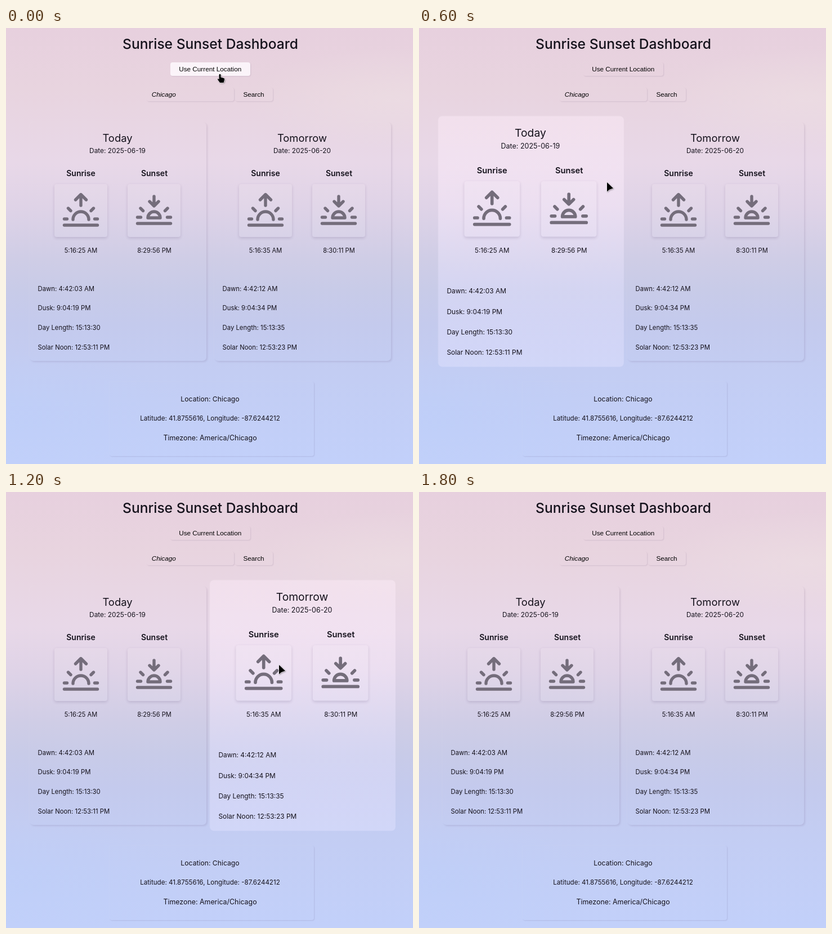
Recreate the animation shown at these times as an HTML page. Size 723 px wide and 774 px high, loop 1.85 s.

```html
<!DOCTYPE html>
<html lang="en">
<head>
<meta charset="utf-8">
<title>Sunrise Sunset Dashboard</title>
<style>
html, body { margin: 0; width: 100%; height: 100%; overflow: hidden; }
#stage {
  position: relative; width: 723px; height: 774px; overflow: hidden;
  background:
    radial-gradient(ellipse 260px 90px at 690px 125px, rgba(238,224,228,.55), transparent),
    radial-gradient(ellipse 330px 120px at 0 690px, rgba(186,207,251,.4), transparent),
    linear-gradient(#e7d0de, #e8d4df 14%, #e8d8e8 31%, #dfd3e7 41%, #cfcde6 53%,
      #c8cbe8 60%, #c4caed 68%, #c3cdf3 79%, #c2d0fa);
}
#stage div { position: absolute; box-sizing: border-box; }
svg { position: absolute; left: 0; top: 0; overflow: visible; }
text { font-family: Poppins, Inter, sans-serif; fill: #15121c; }
text.ui { font-family: Arial, "Liberation Sans", sans-serif; fill: #000; }
.raised { border-radius: 4px; box-shadow: 1px 1px 2px rgba(70,50,90,.13), -1px -1px 2px rgba(255,255,255,.07); }
.card { top: 167px; width: 313.5px; height: 424px; border-radius: 7px; }
.glow {
  inset: 0; border-radius: 7px;
  background: linear-gradient(rgba(255,238,250,.42), rgba(255,240,255,.4) 35%, rgba(228,226,255,.42) 70%, rgba(226,226,255,.46));
}
.tile {
  top: 110px; width: 94px; height: 94px; border-radius: 4px;
  background: rgba(255,255,255,.06); box-shadow: 0 2px 5px rgba(60,40,90,.16);
}
.tile path { fill: none; stroke: #746d7b; stroke-width: 5.4; stroke-linecap: round; stroke-linejoin: round; }
#cursor { filter: drop-shadow(1px 1px 1px rgba(0,0,0,.35)); }
#arrow, #hand { stroke: #fff; stroke-width: 1; paint-order: stroke; }
#beam { fill: none; stroke: #444; stroke-width: 1.2; }
</style>
</head>
<body>
<div id="stage"></div>
<script>
const LOOP = 1850, STEP = 50, FADE = 150;
const find = id => document.getElementById(id);

const text = (x, y, size, str, extra = '') =>
  `<text x="${x}" y="${y}" font-size="${size}" ${extra}>${str}</text>`;
const mid = (x, y, size, str, extra = '') => text(x, y, size, str, 'text-anchor="middle" ' + extra);
const svg = (w, h, body) => `<svg width="${w}" height="${h}">${body}</svg>`;
const box = (x, y, w, h, id = '') =>
  `<div class="raised" id="${id}" style="left:${x}px;top:${y}px;width:${w}px;height:${h}px"></div>`;

const RISE = 'M0 38V19M-9.5 28L0 18.5L9.5 28M-22.5 43l4.5 4.5M22.5 43l-4.5 4.5' +
  'M-14 63A14 14 0 0 1 14 63M-29.5 62h5M29.5 62h-5M-29.5 73h59';
const SET = 'M0 22V38M-8 31L0 39L8 31M-24 43l4.5 4.5M24 43l-4.5 4.5' +
  'M-11 60A11 11 0 0 1 11 60ZM-29.5 59h6M29.5 59h-6M-29.5 70h59';

const tile = (x, d) =>
  `<div class="tile" style="left:${x}px">${svg(94, 94, `<path transform="translate(47)" d="${d}"/>`)}</div>`;

function card(id, x, title, date, rise, set, rows) {
  return `<div class="raised card" id="${id}" style="left:${x}px"><div class="glow"></div>` +
    tile(44, RISE) + tile(174, SET) +
    svg(313, 424,
      mid(156, 34.8, 18.4, title) +
      mid(156, 54.7, 11.9, 'Date: ' + date) +
      mid(91, 96.4, 14, 'Sunrise', 'font-weight="600"') +
      mid(221.5, 96.4, 14, 'Sunset', 'font-weight="600"') +
      mid(91, 231.5, 11.1, rise) + mid(221.5, 231.5, 11.1, set) +
      rows.map((r, i) => text(14.5, 299.8 + 34.6 * i, 11.35, r)).join('')) + '</div>';
}

find('stage').innerHTML =
  box(292, 61, 142, 23.5, 'locate') + box(250, 106, 155, 24) + box(407, 106, 67, 24) +
  box(184, 628, 363, 131.5) +
  card('today', 42, 'Today', '2025-06-19', '5:16:25 AM', '8:29:56 PM',
    ['Dawn: 4:42:03 AM', 'Dusk: 9:04:19 PM', 'Day Length: 15:13:30', 'Solar Noon: 12:53:11 PM']) +
  card('tomorrow', 370.4, 'Tomorrow', '2025-06-20', '5:16:35 AM', '8:30:11 PM',
    ['Dawn: 4:42:12 AM', 'Dusk: 9:04:34 PM', 'Day Length: 15:13:35', 'Solar Noon: 12:53:23 PM']) +
  svg(723, 774,
    mid(363, 37, 24.6, 'Sunrise Sunset Dashboard', 'font-weight="500"') +
    mid(362.7, 76.7, 11.75, 'Use Current Location', 'class="ui"') +
    text(258.7, 122, 11.75, 'Chicago', 'class="ui" font-style="italic"') +
    mid(440, 122, 11.75, 'Search', 'class="ui"') +
    mid(362.5, 662.8, 12.2, 'Location: Chicago') +
    mid(362.5, 697.4, 11.6, 'Latitude: 41.8755616, Longitude: -87.6244212') +
    mid(362.5, 732.1, 12.4, 'Timezone: America/Chicago') +
    `<g id="cursor">
      <path id="arrow" d="M0 0V16.5L4 13L11 10.5Z"/>
      <path id="hand" d="M-2.5 0Q-1-2.5.5 0V4.5L6 6Q7.5 6.5 7 9L5.5 14H-1L-5 8.5Q-5.5 6.5-2.5 8Z"/>
      <path id="beam" d="M-2-7H2M0-7V7M-2 7H2"/>
    </g>`);

const [locate, today, tomorrow, cursor, arrow, hand, beam] =
  ['locate', 'today', 'tomorrow', 'cursor', 'arrow', 'hand', 'beam'].map(find);

// Pointer path: time, x, y
const PATH = [[0, 381, 83], [100, 380, 82], [150, 371, 84], [200, 325, 155], [250, 292, 197],
  [400, 318, 249], [600, 334, 274], [750, 481, 303], [1000, 485, 307], [1200, 485, 307],
  [1350, 343, 109], [1450, 336, -30], [LOOP, 336, -30]];

function pointer(t) {
  const i = PATH.findIndex(p => p[0] > t), a = PATH[i - 1], b = PATH[i];
  const k = (t - a[0]) / (b[0] - a[0]);
  return [1, 2].map(j => a[j] + (b[j] - a[j]) * k);
}

const ease = (t, start) => {
  const k = Math.min(1, Math.max(0, (t - start) / FADE));
  return 1 - (1 - k) ** 2;
};

function lift(el, k) {
  el.style.transform = `scale(${1 + .05 * k})`;
  el.firstChild.style.opacity = k;
  el.style.boxShadow = `2px 2px 3px rgba(70,50,90,${.11 * (1 - k)}), -1px -1px 2px rgba(255,255,255,.08)`;
}

const begin = performance.now();

function draw() {
  const t = Math.floor((performance.now() - begin) % LOOP / STEP) * STEP;
  lift(today, ease(t, 232) - ease(t, 600));
  lift(tomorrow, ease(t, 600) - ease(t, 1346));
  locate.style.background = `rgba(255,252,255,${.82 * (1 - ease(t, 175))})`;

  const [x, y] = pointer(t);
  cursor.setAttribute('transform', `translate(${x} ${y})`);
  const shape = y > 61 && y < 85 && x > 292 ? hand : y > 105 && y < 130 && x < 405 ? beam : arrow;
  for (const s of [arrow, hand, beam]) s.style.display = s === shape ? '' : 'none';
  requestAnimationFrame(draw);
}
draw();
</script>
</body>
</html>
```
